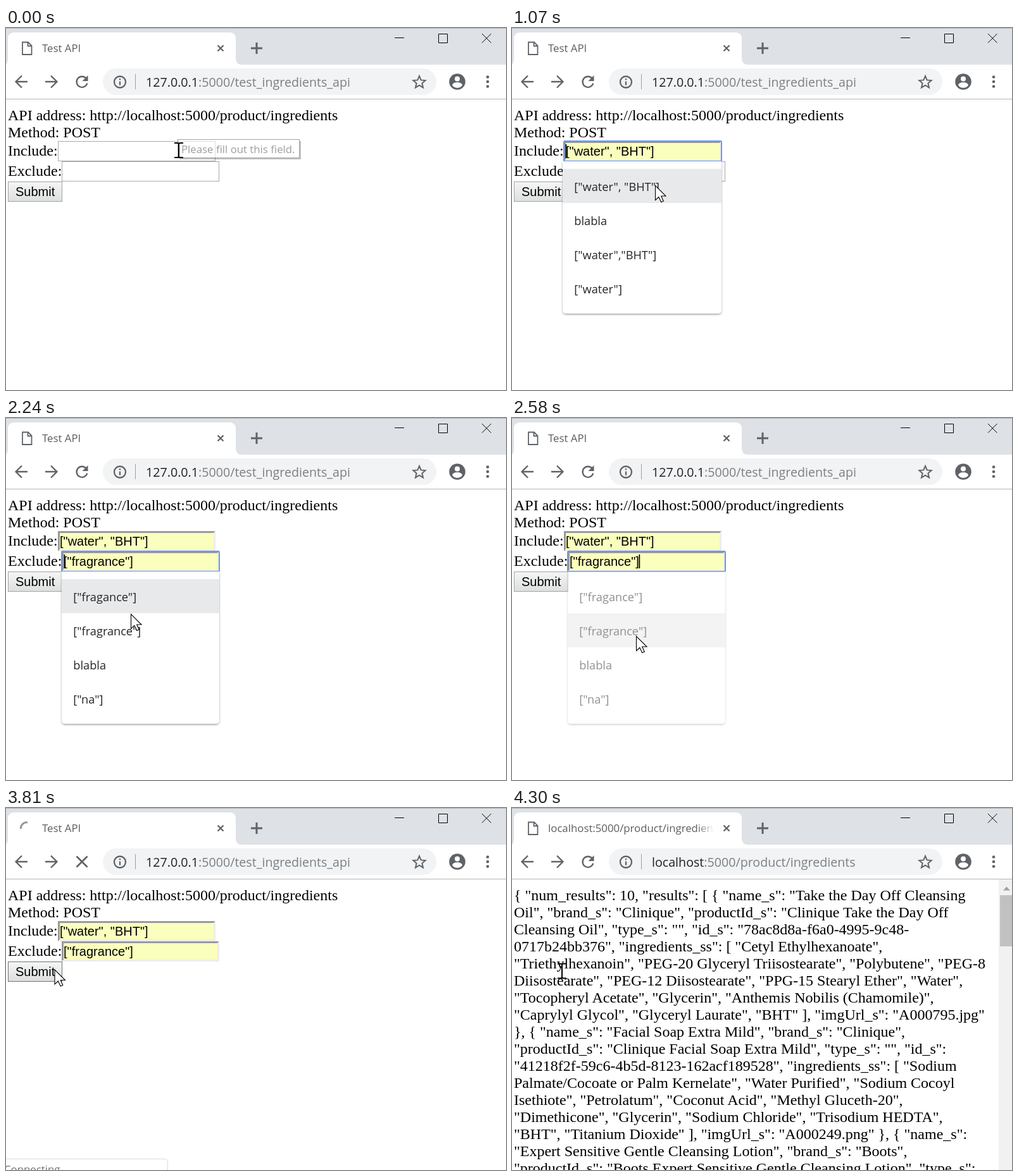
Animation of 790 by 573 pixels, one loop 5.52 s. Source, as an HTML page:

```html
<!DOCTYPE html>
<html lang="en">
<head>
<meta charset="utf-8">
<title>Test API</title>
<style>
  html, body { margin: 0; width: 100%; height: 100%; overflow: hidden; background: #fff; }
  svg { display: block; width: 790px; height: 573px; }
  text { white-space: pre; }
  .ui { font-family: "Open Sans", "Noto Sans", sans-serif; font-size: 16.8px; fill: #5a5e62; }
  .url { font-size: 19.65px; fill: #7b8085; }
  .option { font-size: 18.2px; fill: #25262b; }
  .page { font: 24px "Liberation Serif", "Times New Roman", serif; }
  .control { font: 20px "Liberation Sans", Arial, sans-serif; }
  .icon { fill: none; stroke: #5f6368; stroke-width: 2.3; }
  .thin { fill: none; stroke: #000; stroke-width: 1; }
</style>
</head>
<body>
<svg viewBox="0 0 790 573">
  <defs>
    <linearGradient id="titleFade" gradientUnits="userSpaceOnUse" x1="292" x2="320" y1="0" y2="0">
      <stop stop-color="#5a5e62"/><stop offset="1" stop-color="#5a5e62" stop-opacity="0"/>
    </linearGradient>
    <linearGradient id="button" x2="0" y2="1">
      <stop stop-color="#f5f6f6"/><stop offset="1" stop-color="#dddfdf"/>
    </linearGradient>
    <linearGradient id="pressed" x2="0" y2="1">
      <stop stop-color="#dcdcdc"/><stop offset="1" stop-color="#f0f0f0"/>
    </linearGradient>
    <filter id="shadow" x="-10%" y="-10%" width="120%" height="120%">
      <feDropShadow dx="0" dy="1.5" stdDeviation="1.8" flood-opacity=".38"/>
    </filter>
  </defs>

  <g id="content"></g>

  <!-- window frame and tab -->
  <rect width="790" height="58" fill="#dee1e6"/>
  <rect width="790" height="1" fill="#afb2b7"/>
  <path d="M0 58Q3 55 3 49V17Q3 7 13 7H353Q363 7 363 17V48Q363 58 373 58V112H0Z" fill="#fff"/>
  <rect y="58" width="790" height="54" fill="#fff"/>
  <rect y="112" width="790" height="1" fill="#b4b6b8"/>
  <path class="icon" d="M334.500 27.500l9 9m0-9l-9 9" stroke-width="2"/>
  <path class="icon" d="M387 32h18M396 23v18" style="stroke-width:3"/>
  <path class="thin" d="M614 15.500h15M683.500 9.500h14v14h-14zM752 9l14.500 14.500m0-14.500L752 23.500"/>

  <!-- toolbar -->
  <path class="icon" d="M34 85H15.500M25 75.500L15.500 85l9.500 9.500M62 85h18.500M71 75.500L80.500 85 71 94.500"/>
  <rect x="153" y="64" width="527" height="42" rx="21" fill="#f1f3f4"/>
  <circle class="icon" cx="180" cy="85.500" r="9"/>
  <path class="icon" d="M180 80v2.300M180 84.500v6"/>
  <rect x="204" y="73" width="1" height="24" fill="#9da1a5"/>
  <path class="icon" style="stroke-width:2" d="M653 76l2.700 6.400 6.900.6-5.200 4.500 1.600 6.800-6-3.600-6 3.600 1.600-6.800-5.200-4.500 6.900-.6z"/>
  <circle cx="713" cy="85" r="12.800" fill="#5f6368"/>
  <circle cx="713" cy="80.500" r="4" fill="#fff"/>
  <path d="M705 90.500q1-4.500 8-4.500t8 4.500q-3 4.300-8 4.300t-8-4.300z" fill="#fff"/>
  <g fill="#5f6368"><circle cx="761" cy="77.500" r="2.300"/><circle cx="761" cy="85" r="2.300"/><circle cx="761" cy="92.500" r="2.300"/></g>

  <g id="chrome"></g>
  <g id="overlay"></g>
</svg>

<script>
const LOOP = 5520;
const WATER = '["water", "BHT"]', FRAGRANCE = '["fragrance"]';
const fields = [
  { x: 82, y: 179, menuX: 80, menuW: 251, options: [WATER, 'blabla', '["water","BHT"]', '["water"]'] },
  { x: 88, y: 211, menuX: 88, menuW: 249, options: ['["fragance"]', FRAGRANCE, 'blabla', '["na"]'] }
];
const resultLines = `{ "num_results": 10, "results": [ { "name_s": "Take the Day Off Cleansing
Oil", "brand_s": "Clinique", "productId_s": "Clinique Take the Day Off
Cleansing Oil", "type_s": "", "id_s": "78ac8d8a-f6a0-4995-9c48-
0717b24bb376", "ingredients_ss": [ "Cetyl Ethylhexanoate",
"Triethylhexanoin", "PEG-20 Glyceryl Triisostearate", "Polybutene", "PEG-8
Diisostearate", "PEG-12 Diisostearate", "PPG-15 Stearyl Ether", "Water",
"Tocopheryl Acetate", "Glycerin", "Anthemis Nobilis (Chamomile)",
"Caprylyl Glycol", "Glyceryl Laurate", "BHT" ], "imgUrl_s": "A000795.jpg"
}, { "name_s": "Facial Soap Extra Mild", "brand_s": "Clinique",
"productId_s": "Clinique Facial Soap Extra Mild", "type_s": "", "id_s":
"41218f2f-59c6-4b5d-8123-162acf189528", "ingredients_ss": [ "Sodium
Palmate/Cocoate or Palm Kernelate", "Water Purified", "Sodium Cocoyl
Isethiote", "Petrolatum", "Coconut Acid", "Methyl Gluceth-20",
"Dimethicone", "Glycerin", "Sodium Chloride", "Trisodium HEDTA",
"BHT", "Titanium Dioxide" ], "imgUrl_s": "A000249.png" }, { "name_s":
"Expert Sensitive Gentle Cleansing Lotion", "brand_s": "Boots",
"productId_s": "Boots Expert Sensitive Gentle Cleansing Lotion", "type_s":`.split('\n');

const initial = {
  at: [273, 193.5], beam: true, tip: 0.6, focus: -1, caret: 0, menu: -1, menuAlpha: 1, hover: -1,
  values: ['', ''], button: 'idle', spin: null, status: 0, result: false
};

// Each step: time in ms, then what changes at that time.
const steps = [
  [70, { tip: 0.4 }], [150, { tip: 0.2 }], [220, { tip: 0 }],
  // open the first list and pick its first entry
  [380, { focus: 0, caret: 85, menu: 0, menuAlpha: 0.5 }],
  [450, { menuAlpha: 1 }],
  [760, { at: [267, 201] }],
  [840, { at: [251, 222], beam: false }],
  [920, { at: [236, 240], hover: 0, values: [WATER, ''] }],
  [1000, { at: [229, 247] }],
  [1070, { at: [226, 249] }],
  [1240, { menuAlpha: 0.5, caret: 225 }],
  [1310, { at: [224, 246], menu: -1, hover: -1 }],
  [1390, { at: [217, 236], beam: true }],
  [1470, { at: [212, 229] }],
  // second list, second entry
  [1550, { focus: 1, caret: 92, menu: 1, menuAlpha: 0.5 }],
  [1620, { menuAlpha: 1 }],
  [2100, { at: [209, 240] }],
  [2170, { at: [202, 274], beam: false, hover: 0, values: [WATER, '["fragance"]'] }],
  [2240, { at: [197, 310], values: [WATER, FRAGRANCE] }],
  [2330, { at: [196, 336], hover: 1 }],
  [2410, { at: [196, 345] }],
  [2580, { menuAlpha: 0.5, caret: 201 }],
  [2660, { at: [193, 342], menu: -1, hover: -1 }],
  [2730, { at: [181, 331] }],
  [2810, { at: [160, 314] }],
  [2890, { at: [134, 296] }],
  [2960, { at: [111, 281] }],
  [3040, { at: [94, 270] }],
  [3110, { at: [86, 266], button: 'hover' }],
  // submit, load, show the reply
  [3190, { at: [80, 259] }],
  [3270, { at: [77, 256] }],
  [3340, { at: [76.5, 255.5] }],
  [3420, { focus: -1, button: 'pressed' }],
  [3490, { button: 'hover' }],
  [3570, { spin: 90 }], [3650, { spin: 60 }], [3720, { spin: 30 }],
  [3810, { spin: 0, status: 0.85 }],
  [3900, { spin: null, result: true }],
  [4220, { at: [79, 258], beam: true, status: 0.4 }],
  [4300, { status: 0 }]
];

const escapeText = s => s.replace(/&/g, '&amp;').replace(/</g, '&lt;');
const text = (cls, x, y, s, attrs = '') => `<text class="${cls}" x="${x}" y="${y}" ${attrs}>${escapeText(s)}</text>`;
const rect = (x, y, w, h, attrs) => `<rect x="${x}" y="${y}" width="${w}" height="${h}" ${attrs}/>`;
const path = (d, attrs) => `<path d="${d}" ${attrs}/>`;

function drawField(s, i) {
  const { x, y } = fields[i], value = s.values[i], focused = s.focus === i;
  let out = rect(x + .5, y + .5, 248, 31, 'fill="#fff" stroke="#a9a9a9"');
  if (value) {
    out = rect(x, y, 249, 32, 'fill="#faffbd"')
      + path(`M${x} ${y + 32}V${y}h249l-3 3H${x + 3}v26z`, 'fill="#9a9a9a"')
      + path(`M${x} ${y + 32}h249V${y}l-3 3v26H${x + 3}z`, 'fill="#ededed"');
  }
  if (focused) out += rect(x, y, 249, 32, 'rx="1.5" fill="none" stroke="#659af0" stroke-width="2"');
  out += text('control', x + 3, y + 23, value);
  if (focused) out += rect(s.caret - .5, y + 5, 1.7, 22, 'fill="#000"');
  return out;
}

function drawMenu(s) {
  if (s.menu < 0) return '';
  const { menuX: x, menuW: w, y, options } = fields[s.menu], top = y + 32;
  const box = path(`M${x} ${top}h${w}v235q0 6-6 6H${x + 6}q-6 0-6-6z`, 'fill="#fff" filter="url(#shadow)"');
  const hover = s.hover < 0 ? '' : rect(x, top + 12 + 54 * s.hover, w, 54, 'fill="#e8e9eb"');
  const labels = options.map((o, i) => text('ui option', x + 18.3, top + 47 + 54 * i, o)).join('');
  return `<g opacity="${s.menuAlpha}">${box}${hover}${labels}</g>`;
}

function drawForm(s) {
  const border = s.button === 'idle' ? '#a3a3a3' : '#737373';
  const fill = s.button === 'pressed' ? 'pressed' : 'button';
  return text('page', 3, 146, 'API address: http://localhost:5000/product/ingredients')
    + text('page', 3, 173, 'Method: POST')
    + text('page', 3, 202, 'Include:') + text('page', 3, 234, 'Exclude:')
    + rect(3.5, 243.5, 85, 31, `fill="url(#${fill})" stroke="${border}"`)
    + text('control', 15, 266, 'Submit')
    + drawField(s, 0) + drawField(s, 1) + drawMenu(s);
}

function drawResult() {
  return resultLines.map((line, i) => text('page', 3, 146 + 27 * i, line)).join('')
    + rect(769, 113, 21, 460, 'fill="#f1f1f1"')
    + path('M776 130.500l5.500-6 5.500 6z', 'fill="#a0a0a3"')
    + rect(771, 138, 19, 81, 'fill="#c1c1c1"');
}

function drawChrome(s) {
  const loading = s.spin !== null;
  const [host, rest] = s.result ? ['localhost', ':5000/product/ingredients'] : ['127.0.0.1', ':5000/test_ingredients_api'];
  const tabIcon = loading
    ? path('M23.500 33A9 9 0 0 1 34 23', `fill="none" stroke="#94979b" stroke-width="3" transform="rotate(${s.spin} 32 32)"`)
    : path('M26 22.500h9l5.500 5.500v14H26zM34.500 23v5.500h6', 'class="icon" style="stroke-width:1.8"');
  const reload = loading
    ? path('M111.500 76.500l17 17m0-17l-17 17', 'class="icon" style="stroke-width:2.7"')
    : path('M126.800 80A8.500 8.500 0 1 0 128.300 87.500', 'class="icon"') + path('M129.500 75v9h-9z', 'fill="#5f6368"');
  const title = s.result
    ? text('ui', 57, 38, host + rest, 'style="fill:url(#titleFade)"')
    : text('ui', 57, 38, 'Test API');
  return tabIcon + reload + title
    + `<text class="ui url" x="221" y="93"><tspan fill="#202124">${host}</tspan>${rest}</text>`;
}

function drawOverlay(s) {
  const [x, y] = s.at;
  const tip = `<g opacity="${s.tip}">`
    + rect(274, 179, 192, 29, 'fill="#000" opacity=".4"')
    + rect(271.5, 176.5, 192, 29, 'fill="#fff" stroke="#686868"')
    + text('ui', 277, 198, 'Please fill out this field.') + '</g>';
  const status = `<g opacity="${s.status}">`
    + path('M-2 555.500H250q5.500 0 5.500 5.500v14H-2z', 'fill="#fff" stroke="#d2d4d7"')
    + text('ui', -3, 577.5, 'Connecting...') + '</g>';
  const pointer = s.beam
    ? path('M-7-11.500h5q2 0 2 2 0-2 2-2h5M0-10v20M-7 11.500h5q2 0 2-2 0 2 2 2h5', 'fill="none" stroke="#000" stroke-width="2"')
    : path('M.5.500V23.500L5.800 18.500 9.700 26.500 13.300 25 9.700 17H17z', 'fill="#fff" stroke="#000" stroke-width="1.100"');
  return (s.tip ? tip : '') + (s.status ? status : '') + `<g transform="translate(${x} ${y})">${pointer}</g>`;
}

const layer = id => document.getElementById(id);
let shown = -1;

function frame(now) {
  const time = now % LOOP;
  const done = steps.filter(([start]) => start <= time);
  if (done.length !== shown) {
    shown = done.length;
    const state = Object.assign({}, initial, ...done.map(step => step[1]));
    layer('content').innerHTML = state.result ? drawResult() : drawForm(state);
    layer('chrome').innerHTML = drawChrome(state);
    layer('overlay').innerHTML = drawOverlay(state);
  }
  requestAnimationFrame(frame);
}
frame(performance.now());
</script>
</body>
</html>
```
